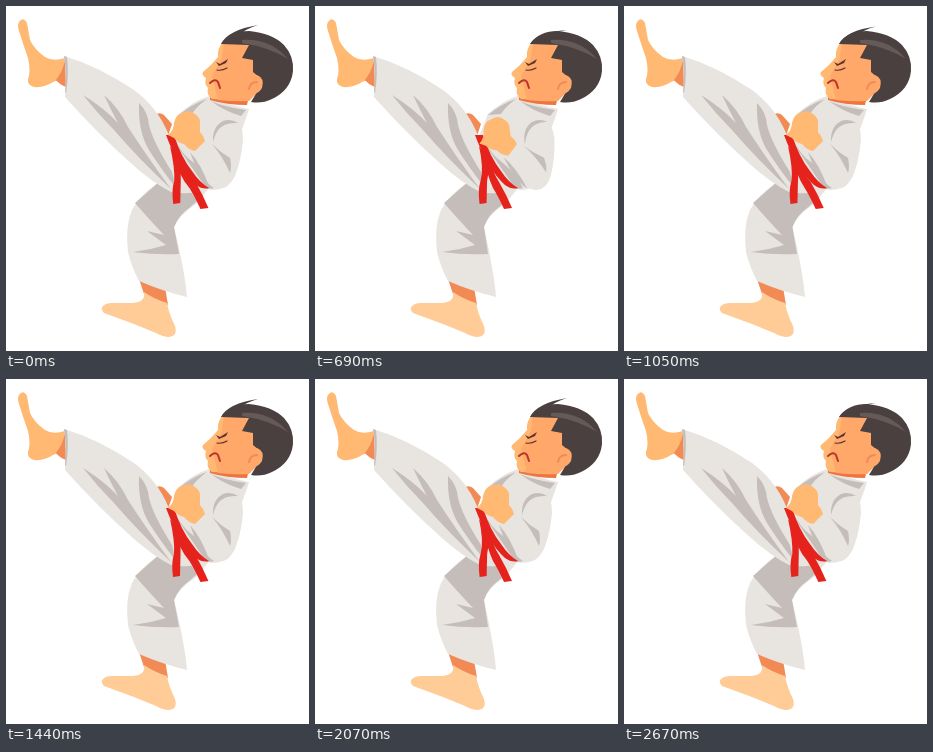
These frames come from a looping animation (303x345 px, 2.7 s). An HTML page with a canvas:

```html
<!DOCTYPE html>
<html lang="en">
<head>
<meta charset="utf-8">
<title>Karate kick</title>
<style>
html, body { margin: 0; width: 100%; height: 100%; overflow: hidden; background: #fff; }
canvas { display: block; width: 303px; height: 345px; }
</style>
</head>
<body>
<canvas id="stage"></canvas>
<script>
const W = 303, H = 345, LOOP = 2700, STEP = 30;
const canvas = document.getElementById('stage');
const ctx = canvas.getContext('2d');
const ratio = window.devicePixelRatio || 1;
canvas.width = W * ratio;
canvas.height = H * ratio;

const CLOTH = '#e8e4e0', FOLD = '#c5bdba', RED = '#e5231c';
const SKIN = '#ffb973', PALE = '#ffcb96', FACE = '#ffa86a', TAN = '#f18a54';
const HAIR = '#4b4040', SHEEN = '#665a59', INK = '#5b3430';

const fill = (color, d) => {
  ctx.fillStyle = color;
  ctx.fill(new Path2D(d));
};
const line = (color, width, d) => {
  ctx.strokeStyle = color;
  ctx.lineWidth = width;
  ctx.lineCap = 'round';
  ctx.stroke(new Path2D(d));
};
const ease = x => x * x * (3 - 2 * x);

// Eased value between [time, value] keys.
function track(keys, t) {
  for (let i = 1; i < keys.length; i++) {
    const [t0, a] = keys[i - 1], [t1, b] = keys[i];
    if (t <= t1) return a + (b - a) * ease((t - t0) / (t1 - t0));
  }
  return keys[keys.length - 1][1];
}

const LOCK = [[0, 0], [600, 5], [750, 5], [1050, 1.6], [1440, 1], [2070, 0], [2640, 5], [2700, 5]];
const ARM = [[0, 0], [480, 0], [660, 1], [720, 1], [900, 0], [2700, 0]];

function standingLeg(sway) {
  fill(TAN, 'M133 273L159 281L162 299L138 288Z');
  fill(PALE, 'M138 286Q148 293 161 297Q163 308 169 320Q172 330 163 331Q157 331 150 327L128 318L98 307Q94 303 97 300Q100 297 106 297L127 297Q140 296 138 286Z');
  fill(CLOTH, `M153 176Q134 189 126 204Q119 220 122 246Q126 262 133 275Q156 285 181 291Q179 266 ${168 + sway} 221Q172 210 190 198L204 181Z`);
  fill(FOLD, `M153 176L129 197Q142 212 158 229L141 225L160 239Q144 244 127 246Q149 249 173 248L${168 + sway} 221Q173 209 183 202L191 195L180 178Z`);
}

function kickingLeg() {
  fill(SKIN, 'M13 16Q17 10 21 17L24 34Q28 43 39 51Q47 56 59 52L60 77Q53 73 47 76Q38 82 28 81Q21 79 22 73Q25 65 22 52Q17 38 13 25Q11 19 13 16Z');
  fill(TAN, 'M59 54Q57 65 50 74Q54 79 60 81Z');
  fill(CLOTH, 'M58 50Q92 60 128 84Q151 101 162 127L178 150L200 182Q185 190 165 186Q147 177 127 159Q92 128 59 91Q61 70 58 50Z');
  fill(FOLD, 'M58 50L61 51Q63 69 60 87L59 86Q61 68 58 50Z');
  fill(FOLD, 'M77 89Q98 102 112 117Q105 104 98 89Q113 102 122 121Q140 149 165 183Q132 152 108 124Q92 108 77 89Z');
  fill(FOLD, 'M133 97Q142 106 143 119Q147 136 166 166L170 182Q153 160 143 144Q132 126 133 97Z');
}

function torso() {
  fill(TAN, 'M147 110Q153 105 158 109L166 118L162 130Q153 124 147 110Z');
  fill(CLOTH, 'M173 108Q187 95 203 90Q222 99 243 103Q240 113 236 123Q238 147 229 170Q221 184 205 184Q180 173 163 133Z');
  fill(FOLD, 'M173 109Q186 98 201 93Q190 101 186 108Z');
  fill(FOLD, 'M205 95Q218 101 240 104L235 110Q218 105 205 95Z');
  fill(FOLD, 'M168 132Q176 149 188 157Q201 168 208 182L202 183Q178 167 168 132Z');
}

function belt(right, left) {
  fill(RED, 'M160 129L168 129Q175 151 186 165Q194 177 203 182Q197 184 190 179Q173 164 160 129Z');
  const l = 163.5 + left, r = 187 + right;
  fill(RED, `M164 140L173 153Q175 160 ${l + 8.5} 175L${l + 8} 197L${l + 1} 198Q${l - 1} 184 ${l + 2} 175Q169 162 164 140Z`);
  fill(RED, `M168 148L176 155Q177 165 ${r - 3} 176Q${r + 4} 188 ${r + 10} 202L${r + 2} 203Q${r - 4} 190 ${r - 9} 182Q172 169 168 148Z`);
}

function arm(drop) {
  ctx.save();
  ctx.translate(224, 116);
  ctx.rotate(-0.14 * drop);
  ctx.translate(-224, -116);
  fill(CLOTH, 'M209 119Q217 108 230 112Q237 119 237 134Q235 155 228 171Q223 183 212 183Q203 182 193 165L183 144L198 130L206 140Z');
  fill(FOLD, 'M207 136Q206 121 217 115Q225 112 232 117Q219 116 213 123Q209 128 207 136Z');
  fill(FOLD, 'M206 138Q214 146 224 152Q226 161 224 167Q217 151 206 138Z');
  fill(FOLD, 'M184 146Q195 158 203 180Q196 175 190 162Z');
  fill(SKIN, 'M162 129Q168 124 168 117Q170 108 176 107Q184 103 189 108Q195 112 194 119L194 126Q198 130 199 135L189 145Q183 144 178 138Q172 137 168 132Z');
  ctx.restore();
}

function head(lock) {
  fill('#ee7440', 'M204 91L243 90L241 99Q221 99 204 94Z');
  fill(SKIN, 'M218 35Q211 42 212 51Q205 60 197 66Q195 69 200 72Q198 78 202 82Q200 89 206 93L224 94L226 35Z');
  fill(FACE, 'M218 35L216 52L206 70L212 94Q228 96 243 95L256 82L256 50L240 35Z');
  fill(HAIR, 'M215 38Q224 25 243 25Q266 27 278 39Q288 50 287 65Q285 84 266 93Q256 98 245 96L251 86Q255 78 253 71L247 66L247 54L236 52L243 39Z');
  fill(SHEEN, 'M236 34Q264 32 282 53Q263 41 236 37Z');
  fill(HAIR, `M215 38Q222 ${24 + lock * 0.4} 252 ${19 + lock}Q239 ${23 + lock * 0.7} 234 29Q226 31 215 38Z`);
  fill(FACE, 'M238 77Q243 68 251 69Q259 72 256 82Q252 89 243 89Z');
  line(TAN, 2, 'M243 83Q244 76 251 76');
  fill(INK, 'M210 56L214 58L222 53L220 57L213 60Z');
  line(INK, 1.2, 'M211 64Q216 65 221 62');
  line('#b8362a', 2, 'M204 77Q209 72 212 76L214 82');
}

function draw(time) {
  const t = Math.floor(time % LOOP / STEP) * STEP;
  const swing = lag => (1 + Math.cos(4 * Math.PI * (t - lag) / LOOP)) / 2;
  ctx.setTransform(ratio, 0, 0, ratio, 0, 0);
  ctx.fillStyle = '#fff';
  ctx.fillRect(0, 0, W, H);
  standingLeg(1 - swing(0));
  torso();
  kickingLeg();
  belt(5.5 * swing(40), 2.8 * swing(-50));
  arm(track(ARM, t));
  head(track(LOCK, t));
}

const start = performance.now();
function frame() {
  draw(performance.now() - start);
  requestAnimationFrame(frame);
}
frame();
</script>
</body>
</html>
```
